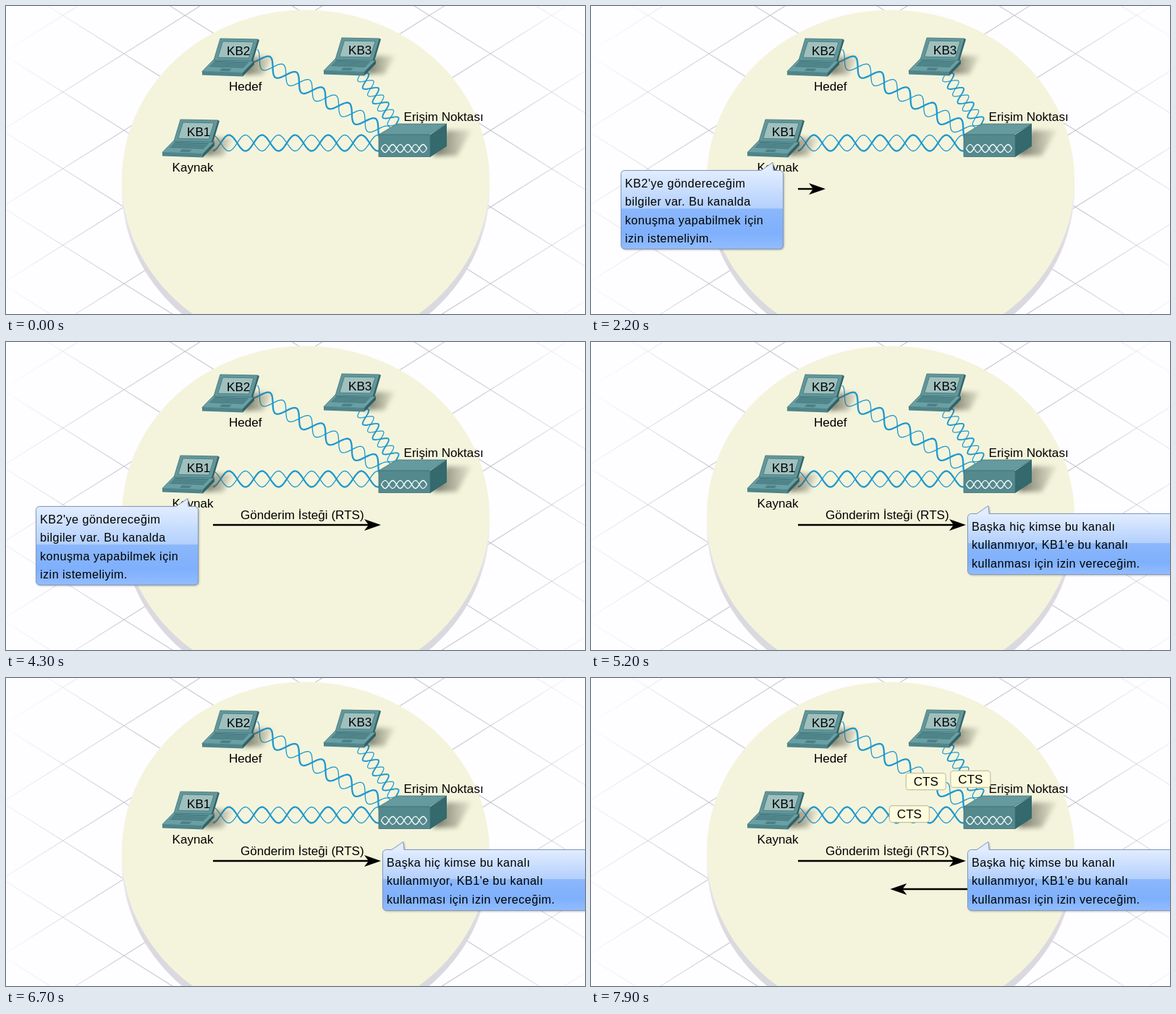
An HTML page with a canvas that plays this animation: 800x426 px, repeating every 8000 ms.

```html
<!DOCTYPE html>
<html lang="tr">
<head>
<meta charset="utf-8">
<title>RTS / CTS</title>
<style>
html, body { margin: 0; width: 100%; height: 100%; overflow: hidden; background: #fefdff; }
canvas { display: block; width: 800px; height: 426px; }
</style>
</head>
<body>
<canvas id="stage" width="800" height="426"></canvas>
<script>
const W = 800, H = 426, LOOP = 8000, STEP = 100;
const ARROW_SPEED = .0933, PACKET_TIME = 1960;
const ASK = 100, RTS = 2200, RTS_LABEL = 4300, REPLY = 5100, CTS = 7100;
const BLUE = '#1e98ce', EDGE = '#3f757a';
const ctx = document.getElementById('stage').getContext('2d');

const hub = { x: 546, y: 189.5 };
const laptops = [
  { label: 'KB2', dx: 55, dy: -112, goal: { x: 342, y: 76 } },
  { label: 'KB3', dx: 223, dy: -113, goal: { x: 493, y: 68 } },
  { label: 'KB1', dx: 0, dy: 0, goal: { x: 286, y: 186 } }
];

function stroke(color, width, path) {
  ctx.strokeStyle = color;
  ctx.lineWidth = width;
  path ? ctx.stroke(path) : ctx.stroke();
}

function line(x1, y1, x2, y2, color, width) {
  ctx.beginPath();
  ctx.moveTo(x1, y1);
  ctx.lineTo(x2, y2);
  stroke(color, width);
}

function gradient(g, stops) {
  for (const [at, color] of stops) g.addColorStop(at, color);
  return g;
}

function text(s, x, y, size = 17.1, spacing = 0, align = 'left') {
  ctx.font = `${size}px "Liberation Sans", Arial, sans-serif`;
  ctx.letterSpacing = spacing + 'px';
  ctx.textAlign = align;
  ctx.fillStyle = '#000';
  ctx.fillText(s, x, y);
}

// A slanted plane; the returned painter fills a part of it, given in fractions
function plane(ox, oy, ux, uy, vx, vy) {
  return (fill, edge, x = 0, y = 0, w = 1, h = 1) => {
    ctx.save();
    ctx.transform(ux, uy, vx, vy, ox, oy);
    ctx.beginPath();
    ctx.rect(x, y, w, h);
    ctx.restore();
    ctx.fillStyle = fill;
    ctx.fill();
    if (edge) stroke(edge, .8);
  };
}

function shadow(x, y, w, lean, h) {
  ctx.save();
  ctx.filter = 'blur(3px)';
  plane(x, y, w, 0, -lean, h)(gradient(ctx.createLinearGradient(x - lean, 0, x + w, 0),
    [[0, 'rgba(70,72,58,.8)'], [1, 'rgba(110,112,95,.12)']]));
  ctx.restore();
}

function disc(cy, fill) {
  ctx.beginPath();
  ctx.ellipse(414, cy, 254, 235, 0, 0, Math.PI * 2);
  ctx.fillStyle = fill;
  ctx.fill();
}

function ground() {
  ctx.fillStyle = '#fefdff';
  ctx.fillRect(0, 0, W, H);
  const ink = gradient(ctx.createRadialGradient(414, 240, 270, 414, 240, 450),
    [[0, 'rgba(200,198,206,.95)'], [1, 'rgba(200,198,206,.04)']]);
  const slope = .628, gap = 106, nodeX = 163, nodeY = 66;
  for (let y = nodeY - gap * 6; y < H + gap * 6; y += gap) {
    for (const s of [slope, -slope]) {
      line(0, y - nodeX * s, W, y + (W - nodeX) * s, ink, 1.2);
    }
  }
  disc(252, gradient(ctx.createLinearGradient(0, 240, 0, 350),
    [[0, '#f0eff3'], [1, '#dbd9e0']]));
  disc(240.5, '#f4f4dc');
}

// Two mirrored sine strands between two points, phase counted in lobes
function wave(x1, y1, x2, y2, lobes, phase, amp, color, thick, thin) {
  const len = Math.hypot(x2 - x1, y2 - y1);
  ctx.save();
  ctx.translate(x1, y1);
  ctx.rotate(Math.atan2(y2 - y1, x2 - x1));
  for (const [sign, width] of [[-1, thin], [1, thick]]) {
    ctx.beginPath();
    for (let x = 0; x <= len; x++) {
      ctx.lineTo(x, sign * amp * Math.sin((x / len * lobes + phase) * Math.PI));
    }
    stroke(color, width);
  }
  ctx.restore();
}

function laptop({ label, dx, dy }) {
  ctx.save();
  ctx.translate(dx, dy);
  shadow(286, 182, 28, 14, 25);
  const base = plane(232, 186, 56, 2, -16, 16.5);
  base('#6a9fa3', EDGE);
  base('#467c82', null, .06, .1, .84, .5);
  for (let row = .22; row < .6; row += .13) base('#6c9ea1', null, .06, row, .84, .03);
  base('#4b8085', null, .4, .7, .24, .2);
  plane(216, 202.5, 56, 2, 0, 5)('#4d858a');
  plane(272, 204.5, 16, -16.5, 0, 5)('#2f6268');
  const lid = plane(241, 157, 52, 1, -9, 30);
  lid('#63979b', EDGE);
  lid('#a0c0bd', EDGE, .09, .13, .82, .74);
  plane(293, 158, 2, 1, -9, 30)('#2f6268');
  text(label, 250, 179.5);
  ctx.restore();
}

function accessPoint() {
  shadow(609, 172, 34, 20, 35);
  plane(540, 163, 69, 0, -25, 15)('#659a9e', EDGE);
  plane(586, 178, 23, -15, 0, 31)('#34696e');
  plane(515, 178, 71, 0, 0, 30.5)('#54898e', EDGE);
  wave(518.5, 197, 581.5, 197, 6, 0, 5.5, '#f4fafa', 1.5, 1.1);
}

function scene() {
  ground();
  wave(286, 189.5, 517, 189.5, 10.1, .54, 11, BLUE, 2.3, 1.3);
  wave(342, 69, 526, 177, 10.1, .54, 10.5, BLUE, 2.3, 1.3);
  wave(487, 89, 542, 170, 8, .54, 9, BLUE, 1.9, 1.2);
  laptops.forEach(laptop);
  accessPoint();
  text('Hedef', 308, 116.5);
  text('Kaynak', 229.5, 229);
  text('Erişim Noktası', 549.5, 159);
}

function arrow(from, tip, y) {
  const d = Math.sign(tip - from), back = tip - d * 23;
  line(from, y, tip - d * 16, y, '#000', 2.4);
  ctx.beginPath();
  ctx.moveTo(tip, y);
  ctx.lineTo(back, y - 8);
  ctx.lineTo(back + d * 6, y);
  ctx.lineTo(back, y + 8);
  ctx.fillStyle = '#000';
  ctx.fill();
}

function bubble(x, y, w, h, tipX, lines) {
  const box = new Path2D();
  const r = 5, right = x + w, bottom = y + h;
  box.moveTo(x + r, y);
  box.lineTo(tipX - 16, y);
  box.lineTo(tipX, y - 11);
  box.lineTo(tipX + 1, y);
  box.arcTo(right, y, right, bottom, r);
  box.arcTo(right, bottom, x, bottom, r);
  box.arcTo(x, bottom, x, y, r);
  box.arcTo(x, y, right, y, r);
  box.closePath();
  ctx.save();
  ctx.shadowColor = 'rgba(60,65,80,.5)';
  ctx.shadowBlur = 3;
  ctx.shadowOffsetX = ctx.shadowOffsetY = 1;
  ctx.fillStyle = gradient(ctx.createLinearGradient(0, y, 0, bottom),
    [[0, '#e2edff'], [.48, '#b3d0fd'], [.49, '#8bb7fb'], [.8, '#7fb0fc'], [1, '#92bcff']]);
  ctx.fill(box);
  ctx.restore();
  stroke('#8299bd', 1, box);
  lines.forEach((s, i) => text(s, x + 5.5, y + 23.5 + i * 25.3, 16.2, .45));
}

function packet({ goal }, progress) {
  const x = hub.x + (goal.x - hub.x) * progress;
  const y = hub.y + (goal.y - hub.y) * progress;
  ctx.beginPath();
  ctx.roundRect(x - 27.5, y - 11.5, 55, 23, 4);
  ctx.fillStyle = '#fefcdc';
  ctx.fill();
  stroke('#c3c1a6', 1.2);
  text('CTS', x, y + 6, 17.1, 0, 'center');
}

function draw(t) {
  scene();
  if (t >= RTS) arrow(286, Math.min(518, 324 + (t - RTS) * ARROW_SPEED), 253);
  if (t >= RTS_LABEL) text('Gönderim İsteği (RTS)', 324, 245);
  if (t >= ASK && t < REPLY) {
    bubble(41.5, 227.5, 224, 108.5, 251, [
      "KB2'ye göndereceğim", 'bilgiler var. Bu kanalda',
      'konuşma yapabilmek için', 'izin istemeliyim.'
    ]);
  }
  if (t >= CTS) {
    const [second, third, first] = laptops;
    arrow(520, 488 - (t - CTS) * ARROW_SPEED, 292);
    for (const node of [first, second, third]) packet(node, (t - CTS) / PACKET_TIME);
  }
  if (t >= REPLY) {
    bubble(520.5, 237.5, 300, 84, 549, [
      'Başka hiç kimse bu kanalı', "kullanmıyor, KB1'e bu kanalı",
      'kullanması için izin vereceğim.'
    ]);
  }
}

// The picture advances in steps of a tenth of a second
const start = performance.now();
let shown = -1;
function tick() {
  const elapsed = (performance.now() - start) % LOOP;
  const t = Math.floor(elapsed / STEP + .05) * STEP % LOOP;
  if (t !== shown) draw(shown = t);
  requestAnimationFrame(tick);
}
tick();
</script>
</body>
</html>
```
